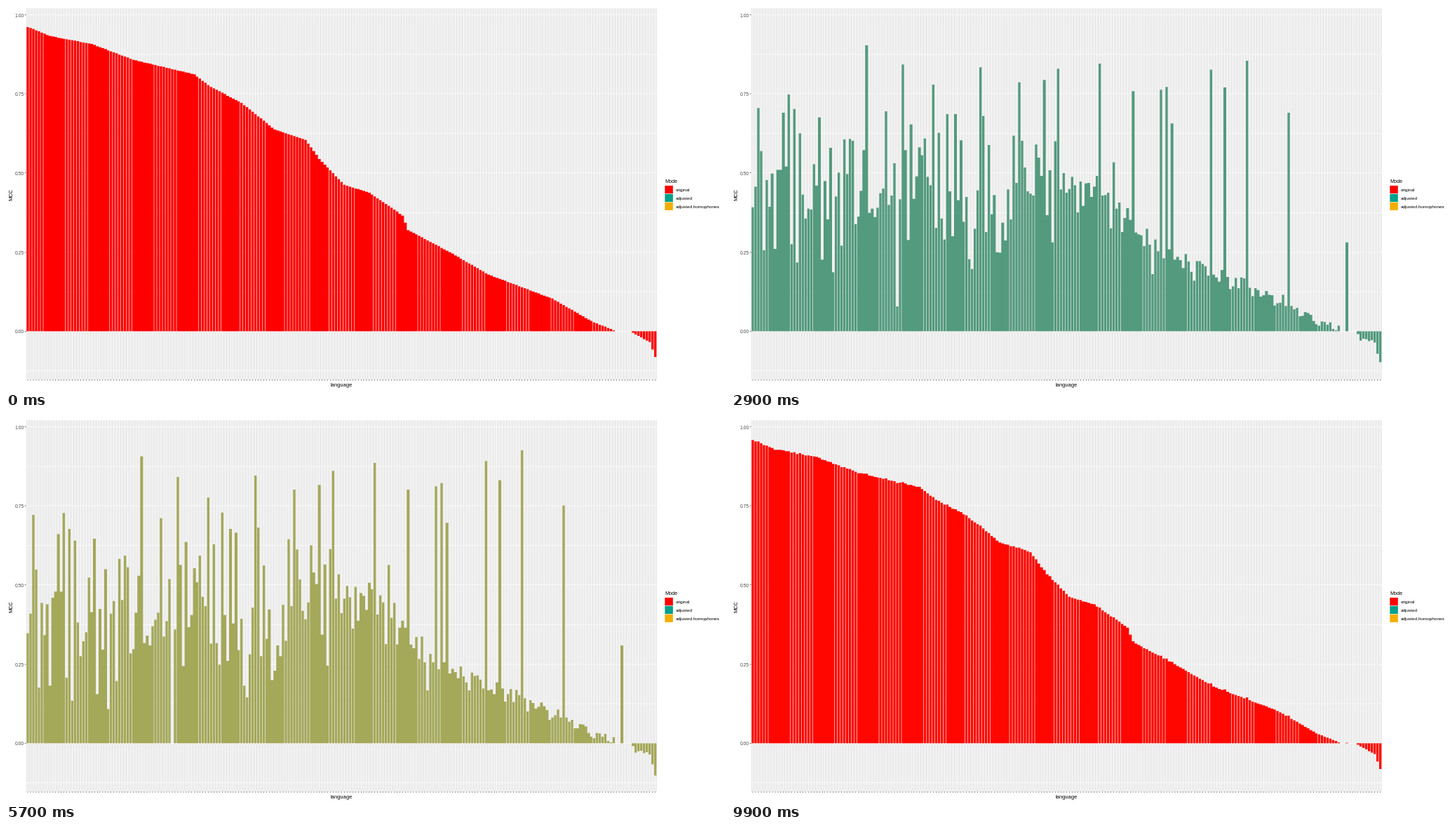
These frames come from a looping animation (1025x547 px, 10 s). A matplotlib script:

```python
import numpy as np
import matplotlib.pyplot as plt
from matplotlib.animation import FuncAnimation
from matplotlib.collections import PolyCollection
from matplotlib.colors import to_rgb
from matplotlib.patches import Polygon

W, H, DPI = 1025, 547, 64
N, STEP = 227, 3.958
LEFT, RIGHT, TOP, BOTTOM = 28.7, 928, 3.3, 532
ZERO, UNIT = 463.4, 450.8
PIXEL = 2 / 3  # edges sit on a grid finer than the stage's pixels
RED, TEAL, GOLD = "#FF0000", "#00A08A", "#F2AD00"

# (bar, value) knots of the sorted curve
CURVE = [
    (0, .962), (8, .933), (23, .908), (38, .858), (60, .812), (66, .772),
    (77, .722), (89, .637), (100, .605), (105, .545), (114, .463),
    (123, .438), (135, .366), (137, .32), (152, .25), (166, .179),
    (189, .103), (203, .032), (212, 0), (217, 0), (224, -.034),
    (226, -.081),
]

# Bars that stand out after adjusting
PEAKS = {
    13: .73, 41: .91, 52: 0, 54: .845, 65: .78, 82: .85, 96: .805,
    105: .82, 110: .865, 125: .89, 137: .805, 147: .815, 149: .825,
    151: .7, 165: .895, 170: .835, 178: .93, 193: .755, 214: .31,
}


def make_modes():
    rng = np.random.default_rng(4)
    bars = np.arange(N)
    peaks, heights = list(PEAKS), np.array(list(PEAKS.values()))

    original = np.interp(bars, *zip(*CURVE))
    # The left half scatters freely, the right half follows the curve
    scatter = np.clip(rng.normal(.43, .15, N), .09, .68)
    follow = original * (1 + rng.laplace(0, .08, N))
    follow += rng.normal(0, .01, N) * (original != 0)
    mix = np.clip((122 - bars) / 16, 0, 1)
    adjusted = mix * scatter + (1 - mix) * follow
    homophones = adjusted * (1 + rng.laplace(0, .06, N))

    adjusted[peaks] = heights
    homophones[peaks] = heights * .992
    return original, adjusted, homophones


TO_XYZ = np.array([[.4124, .3576, .1805],
                   [.2126, .7152, .0722],
                   [.0193, .1192, .9505]])
WHITE = TO_XYZ.sum(axis=1)
TO_LAB = np.array([[0, 116, 0], [500, -500, 0], [0, 200, -200]])


def to_lab(color):
    c = np.array(to_rgb(color))
    linear = np.where(c > .04045, ((c + .055) / 1.055) ** 2.4, c / 12.92)
    q = TO_XYZ @ linear / WHITE
    f = np.where(q > .008856, np.cbrt(q), 7.787 * q + 16 / 116)
    return TO_LAB @ f


def from_lab(lab):
    f = np.linalg.solve(TO_LAB, lab)
    q = np.where(f > .2069, f ** 3, (f - 16 / 116) / 7.787)
    c = np.clip(np.linalg.solve(TO_XYZ, q * WHITE), 0, 1)
    return np.where(c > .0031308, 1.055 * c ** (1 / 2.4) - .055, 12.92 * c)


def snap(v):
    return np.floor(np.asarray(v) / PIXEL + .5) * PIXEL


def y_at(value):
    return ZERO - UNIT * np.asarray(value)


def draw(left, right, top, bottom, color, z=1):
    l, r, t, b = np.broadcast_arrays(left, right, top, bottom)
    corners = [np.stack(p, -1) for p in ((l, t), (r, t), (r, b), (l, b))]
    verts = np.stack(corners, -2).reshape(-1, 4, 2)
    ax.add_collection(PolyCollection(verts, facecolors=color, snap=False,
                                     edgecolors="none", zorder=z),
                      autolim=False)


def h_lines(left, right, y, color):
    y = snap(y - PIXEL / 2)
    draw(left, right, y, y + PIXEL, color)


def v_lines(x, top, bottom, color):
    x = snap(x - PIXEL / 2)
    draw(x, x + PIXEL, top, bottom, color)


def label(x, y, text, px, color="black", ha="left", rotation=0):
    va = "center" if rotation else "center_baseline"
    ax.text(x, y, text, fontsize=px * 72 / DPI, family="Liberation Sans",
            color=color, ha=ha, va=va, rotation=rotation)


def outline(values):
    """One path around all bars, so that touching bars leave no seam."""
    top = snap(y_at(values))
    base = np.full(N, snap(ZERO))
    xs = np.stack([bar_left, bar_left, bar_right, bar_right], -1)
    ys = np.stack([base, top, top, base], -1)
    return np.stack([xs.ravel(), ys.ravel()], -1)


fig = plt.figure(figsize=(W / DPI, H / DPI), dpi=DPI, facecolor="white")
ax = fig.add_axes([0, 0, 1, 1])
ax.set_xlim(0, W)
ax.set_ylim(H, 0)
ax.axis("off")

# Panel, grid and ticks
centers = LEFT + STEP * (np.arange(N) + .6)
major = y_at(np.arange(5) / 4)
minor = y_at(np.arange(-1, 8, 2) / 8)
draw(LEFT, RIGHT, TOP, BOTTOM, "#EBEBEB", 0)
h_lines(LEFT, RIGHT, minor, "white")
v_lines(centers, TOP, BOTTOM, "white")
h_lines(LEFT, RIGHT, major, "white")
v_lines(centers, BOTTOM, BOTTOM + 1.6, "#333333")
h_lines(LEFT - 2, LEFT, major, "#333333")

for i, y in enumerate(major):
    label(26, y + .6, f"{i / 4:.2f}", 6.8, "#4D4D4D", "right")
label(478.3, 540, "language", 7.5, ha="center")
label(8, 268.8, "MCC", 7.4, ha="center", rotation=90)

# Legend
label(939.3, 249.3, "Mode", 7.3)
for i, (name, color) in enumerate([("original", RED), ("adjusted", TEAL),
                                   ("adjusted.homophones", GOLD)]):
    y = 255.9 + 11.9 * i
    draw(939.3, 950.8, y, y + 11.2, color)
    label(955, y + 6.4, name, 6.4)

bar_left = snap(centers - .45 * STEP)
bar_right = snap(centers + .45 * STEP)
original, adjusted, homophones = make_modes()
shape = ax.add_patch(Polygon(outline(original), facecolor=RED, linewidth=0,
                             snap=False, zorder=3))

# Start frame, length in frames, and the two modes of each transition
MOVES = [
    (13, 20, (original, RED), (adjusted, TEAL)),
    (47, 20, (adjusted, TEAL), (homophones, GOLD)),
    (81, 19, (homophones, GOLD), (original, RED)),
]


def state(frame):
    values, color = original, to_rgb(RED)
    for start, length, (v0, c0), (v1, c1) in MOVES:
        if frame >= start:
            t = min((frame - start) / length, 1)
            ease = (1 - np.cos(np.pi * t)) / 2
            lab0, lab1 = to_lab(c0), to_lab(c1)
            values = v0 + (v1 - v0) * ease
            color = from_lab(lab0 + (lab1 - lab0) * ease)
    return values, color


def update(frame):
    values, color = state(frame)
    shape.set_xy(outline(values))
    shape.set_facecolor(color)
    return [shape]


anim = FuncAnimation(fig, update, frames=100, interval=100, repeat=True,
                     repeat_delay=0, blit=False)
plt.show()
```
